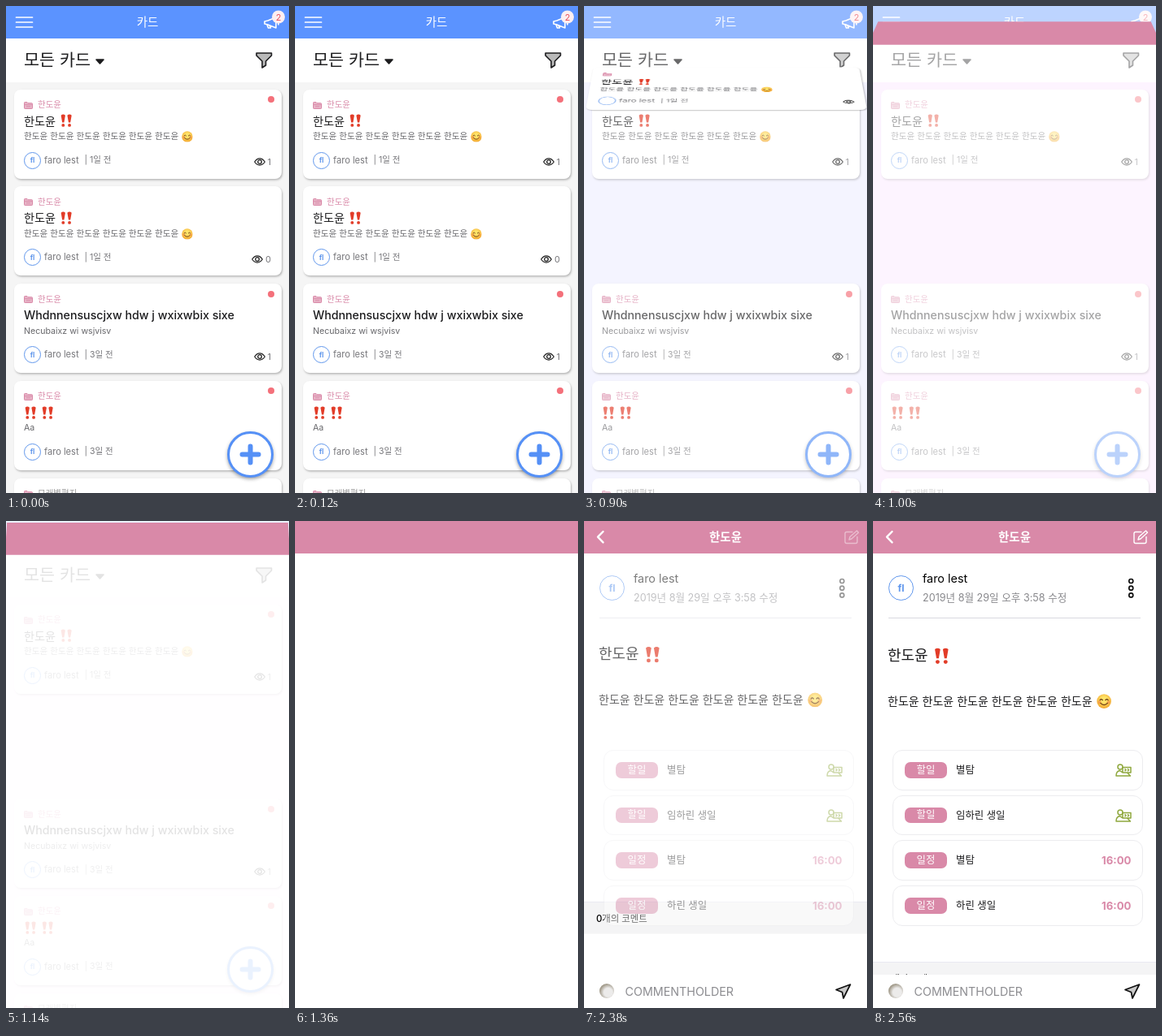
An HTML page for the animation above (2.58 s loop, 348 by 600 pixels).

```html
<!DOCTYPE html>
<html lang="ko">
<head>
<meta charset="utf-8">
<title>Card to page transition</title>
<style>
  :root { --blue: #5b93ff; --pink: #d989a8; --loop: 2580ms; }
  html, body { margin: 0; width: 100%; height: 100%; overflow: hidden; background: #fff; }
  body { font-family: Inter, "Noto Sans CJK KR", "Noto Sans CJK", sans-serif; color: #1c1c1e; }
  #stage { position: relative; width: 348px; height: 600px; overflow: hidden; background: #fff; }
  #stage * { box-sizing: border-box; }
  .layer { position: absolute; inset: 0; overflow: hidden; }
  svg { display: block; flex: none; overflow: visible; }
  svg.art { position: absolute; left: 0; top: 0; }
  .row { position: absolute; display: flex; align-items: center; gap: .36em; height: 20px; line-height: 20px; white-space: pre; }
  .mid { left: 0; width: 348px; justify-content: center; color: #fff; }
  .bang { width: 1.15em; height: 1.15em; }
  .smile { width: 1.3em; height: 1.3em; }
  .ring { position: absolute; border-radius: 50%; border: 1.6px solid #5f96ec; color: #5f96ec;
          display: flex; align-items: center; justify-content: center; font-weight: 700; }

  .top { position: absolute; inset: 0 0 auto; height: 40px; background: var(--blue); }
  .sub { position: absolute; top: 40px; width: 348px; height: 54px; background: #fff; }
  .card { position: absolute; left: 9.5px; width: 329.5px; height: 110px; border-radius: 8px;
          background: #fff; box-shadow: 1px 1.5px 2.5px #0004; }
  .label { font-size: 10.5px; color: var(--pink); gap: 6px; }
  .title { font-size: 14.2px; font-weight: 500; }
  .text { font-size: 10.6px; color: #66666a; }
  .meta { font-size: 11.1px; color: #77777b; }
  .age { font-size: 10.5px; color: #77777b; }
  .views { right: 13px; gap: 3px; font-size: 11px; color: #77777b; }
  .card .ring { left: 12.5px; top: 77px; width: 21px; height: 21px; font-size: 8.5px; }
  .dot { position: absolute; right: 9px; top: 8.5px; width: 8px; height: 8px; border-radius: 50%; background: #f4707a; }
  .fab { position: absolute; left: 272px; top: 524px; width: 57px; height: 57px; border-radius: 50%;
         border: 3px solid #5590f6; background: #fff; box-shadow: 0 2px 4px #0005; }

  .bar { position: absolute; top: 0; width: 348px; height: 40px; background: var(--pink); }
  .line { position: absolute; left: 19px; top: 118.5px; width: 310px; height: 1px; background: #d9d9e0; }
  .task { position: absolute; left: 24px; width: 307.5px; height: 49.5px; border: 1px solid #ececef; border-radius: 12px; background: #fff; }
  .task .row { font-size: 12.4px; }
  .task .tag { left: 14px; width: 52px; height: 19.5px; top: 14px; justify-content: center; border-radius: 7px;
               background: var(--pink); color: #fff; }
  .task .time { right: 13px; font-size: 13.2px; font-weight: 700; color: var(--pink); }
  .strip { position: absolute; top: 320px; width: 348px; height: 40px; background: #f4f4f5; border-top: 1px solid #e9e9f2; }
  .foot { position: absolute; top: 559px; width: 348px; height: 41px; background: #fff; }
  .face { position: absolute; left: 19px; top: 11px; width: 18px; height: 18px; border-radius: 50%;
          background: radial-gradient(circle at 60% 60%, #ecebea 35%, #a9a294 65%, #6f6a4c); }

  /* Each stretch advances in 20 ms ticks. */
  .list { background: #f5f5f5; animation: fade var(--loop) infinite; }
  .slot { animation: leave var(--loop) infinite; }
  .fly { animation: fly var(--loop) infinite; }
  .bar { animation: land var(--loop) infinite; }
  .page { animation: show var(--loop) step-end infinite; }
  .person { animation: person var(--loop) infinite; }
  .body { animation: body var(--loop) infinite; }
  .late { animation: late var(--loop) infinite; }
  .strip { animation: push var(--loop) infinite; }

  @keyframes fade {
    0% { opacity: 1; background-color: #f5f5f5; animation-timing-function: step-end; }
    29.38% { opacity: .95; background-color: #f5f5f6; animation-timing-function: steps(7); }
    34.81% { opacity: .66; background-color: #efefff; animation-timing-function: steps(5); }
    38.68% { opacity: .4; background-color: #fbe4ff; animation-timing-function: steps(6); }
    43.33% { opacity: .14; background-color: #fff0ff; animation-timing-function: steps(8); }
    49.53%, 100% { opacity: 0; background-color: #fff; }
  }
  @keyframes leave {
    0% { opacity: 1; animation-timing-function: step-end; }
    29.38%, 100% { opacity: 0; }
  }
  @keyframes fly {
    0% { opacity: 0; transform: none; animation-timing-function: step-end; }
    29.38% { opacity: 1; transform: translateY(-24.5px) perspective(1700px) translateZ(10px) rotateX(6deg); animation-timing-function: steps(2); }
    30.93% { opacity: 1; transform: translateY(-69px) perspective(1700px) translateZ(17px) rotateX(21deg); animation-timing-function: steps(2); }
    32.48% { opacity: 1; transform: translateY(-112px) perspective(1700px) translateZ(23px) rotateX(38deg); animation-timing-function: steps(3); }
    34.81% { opacity: 1; transform: translateY(-176px) perspective(1700px) translateZ(30px) rotateX(62deg); animation-timing-function: steps(2); }
    36.36%, 100% { opacity: 0; transform: translateY(-209px) perspective(1700px) translateZ(30px) rotateX(86deg); }
    36.35% { opacity: 1; transform: translateY(-209px) perspective(1700px) translateZ(30px) rotateX(86deg); }
  }
  @keyframes land {
    0% { opacity: 0; transform: none; animation-timing-function: step-end; }
    36.36% { opacity: 1; transform: translateY(48px) perspective(380px) rotateX(84deg); animation-timing-function: steps(1); }
    37.13% { opacity: 1; transform: translateY(34px) perspective(380px) rotateX(70deg); animation-timing-function: steps(2); }
    38.68% { opacity: 1; transform: translateY(13px) perspective(380px) rotateX(45deg); animation-timing-function: steps(3); }
    41.01% { opacity: 1; transform: translateY(5px) perspective(380px) rotateX(22deg); animation-timing-function: steps(3); }
    43.33% { opacity: 1; transform: translateY(2px) perspective(380px) rotateX(9deg); animation-timing-function: steps(4); }
    46.43% { opacity: 1; transform: translateY(1px) perspective(380px) rotateX(2deg); animation-timing-function: steps(4); }
    49.53% { opacity: 1; transform: translateY(.6px) perspective(380px) rotateX(0deg); animation-timing-function: step-end; }
    51.86%, 100% { opacity: 1; transform: none; }
  }
  @keyframes show { 0% { opacity: 0; } 86.74%, 100% { opacity: 1; } }
  @keyframes person {
    0%, 86.74% { opacity: .13; animation-timing-function: steps(16); }
    99.15%, 100% { opacity: 1; }
  }
  @keyframes body {
    0%, 86.74% { opacity: .42; transform: translateY(-3px); animation-timing-function: steps(16); }
    99.15%, 100% { opacity: 1; transform: none; }
  }
  @keyframes late {
    0%, 86.74% { opacity: 0; animation-timing-function: steps(16); }
    99.15%, 100% { opacity: 1; }
  }
  @keyframes push {
    0%, 86.74% { transform: none; animation-timing-function: steps(8); }
    92.95% { transform: translateY(170px); animation-timing-function: steps(8); }
    99.15%, 100% { transform: translateY(223px); }
  }
</style>
</head>
<body>
<svg width="0" height="0" style="position:absolute">
  <defs>
    <radialGradient id="sun" cx=".5" cy=".4" r=".6">
      <stop offset=".3" stop-color="#ffe46a"/><stop offset="1" stop-color="#f2a52c"/>
    </radialGradient>
  </defs>
  <symbol id="bang" viewBox="0 0 16 16">
    <path d="M1.6 1.6Q4.2-.4 6.8 1.6L5.3 10.2H3.1ZM9.2 1.6Q11.8-.4 14.4 1.6L12.9 10.2H10.7Z" fill="#e23c28"/>
    <circle cx="4.2" cy="13.6" r="1.9" fill="#e23c28"/><circle cx="11.8" cy="13.6" r="1.9" fill="#e23c28"/>
  </symbol>
  <symbol id="smile" viewBox="0 0 16 16">
    <circle cx="8" cy="8" r="7.8" fill="url(#sun)"/>
    <circle cx="3.2" cy="9" r="1.8" fill="#f28a4a" opacity=".6"/><circle cx="12.8" cy="9" r="1.8" fill="#f28a4a" opacity=".6"/>
    <path d="M3.6 6.8q1.4-2 2.8 0M9.6 6.8q1.4-2 2.8 0M4.2 10q3.8 4 7.6 0" fill="none" stroke="#6b3d14" stroke-width="1.1" stroke-linecap="round"/>
  </symbol>
  <symbol id="folder" viewBox="0 0 11 9">
    <path d="M.5 1.2Q.5.5 1.2.5H4l1 1.2h4.8q.7 0 .7.7v5.4q0 .7-.7.7H1.2q-.7 0-.7-.7Z" fill="#e7b3c6" stroke="#d989a8"/>
    <path d="M1 3.6h9M3 5.8h5" stroke="#d989a8" stroke-width=".8"/>
  </symbol>
  <symbol id="eye" viewBox="0 0 14 10">
    <path d="M.7 5Q3.4.9 7 .9T13.3 5Q10.6 9.1 7 9.1T.7 5Z" fill="#fff" stroke="#222" stroke-width="1.2"/>
    <circle cx="7" cy="5" r="2.3" fill="none" stroke="#222" stroke-width="1.3"/>
  </symbol>
  <symbol id="helper" viewBox="0 0 20 16">
    <g fill="none" stroke="#8fa83e" stroke-width="1.5" stroke-linejoin="round">
      <circle cx="6" cy="4" r="3"/>
      <path d="M1 15q0-5.5 4.5-6.4L9 11h5.5l4 4ZM9 4.5h10V11H9Z"/>
      <path d="M11.5 6.2l1.6 1.5-1.6 1.5M15 6.2l1.6 1.5L15 9.2"/>
    </g>
  </symbol>
</svg>
<div id="stage"></div>

<script>
const user = 'faro lest', initials = 'fl', group = '한도윤';
const icon = (id, w, h) =>
  `<svg class="${id}"${w ? ` width="${w}" height="${h}"` : ''}><use href="#${id}"/></svg>`;
const bang = icon('bang'), smile = icon('smile');

// A line of text whose middle lies at y.
const row = (x, y, cls, html, css = '') =>
  `<div class="row ${cls}" style="${x === null ? '' : `left:${x}px;`}top:${y - 10}px;${css}">${html}</div>`;
const art = body => `<svg class="art" width="348" height="600" fill="none" stroke-linecap="round" stroke-linejoin="round">${body}</svg>`;

function card(i, c, cls = '') {
  const bare = cls === 'fly';
  return `<div class="card ${cls}" style="top:${102.5 + i * 119.8}px">
    ${row(12.5, 19.5, 'label', icon('folder', 11, 9) + (bare ? '' : `<span style="color:${c.tint || ''}">${c.label || group}</span>`))}
    ${row(12.5, 39, 'title', c.title)}
    ${row(12.5, 58.5, 'text', c.text)}
    <div class="ring">${bare ? '' : initials}</div>
    ${row(37.5, 87, 'meta', user)}
    ${row(87, 87.5, 'age', `| ${c.days}일 전`)}
    ${row(null, 89.5, 'views', icon('eye', 14, 10) + (bare ? '' : c.views))}
    ${c.dot ? '<div class="dot"></div>' : ''}
  </div>`;
}

const phrase = Array(6).fill(group).join(' ');
const hello = { title: group + bang, text: phrase + smile, days: 1 };
const cards = [
  { ...hello, views: 1, dot: true },
  { ...hello, views: 0 },
  { title: 'Whdnnensuscjxw hdw j wxixwbix sixe', text: 'Necubaixz wi wsjvisv', days: 3, views: 1, dot: true },
  { title: bang + bang, text: 'Aa', days: 3, views: 1, dot: true },
  { label: '모래별편지~', tint: '#999', title: '', text: '', days: 3, views: 0 }
];

const list = `<div class="layer list">
  <div class="top"></div><div class="sub"></div>
  ${row(0, 19.5, 'mid', '카드', 'font-size:14.5px;font-weight:500')}
  ${row(22, 67, '', '모든 카드', 'font-size:20.7px')}
  ${cards.map((c, i) => card(i, c, i === 1 ? 'slot' : '')).join('')}
  <div class="fab"></div>
  ${art(`
    <path d="M12.5 14h20M12.5 20h20M12.5 26h20" stroke="#fff" stroke-width="1.7"/>
    <path d="M111 66h9l-4.5 5z" fill="#1c1c1e" stroke="#1c1c1e" stroke-width="1.6"/>
    <path d="M308 58h18.500v3l-7 7v5l-4.500 3v-8l-7-7z" fill="#b9b9b9" stroke="#1c1c1e" stroke-width="1.6"/>
    <path d="M318 19l4-1 10-4v13l-10-4-4-1zM321 23l1.500 4h3l-1.500-3M335 18v5" stroke="#fff" stroke-width="1.6"/>
    <circle cx="335" cy="13.500" r="8" fill="#fdeff1"/>
    <path d="M300.500 542.500v20M290.500 552.500h20" stroke="#5590f6" stroke-width="6"/>`)}
  ${row(326, 13.5, '', '2', 'width:18px;justify-content:center;font-size:11px;color:#e8505c')}
</div>`;

const tasks = [['할일', '별탐'], ['할일', '임하린 생일'], ['일정', '별탐', '16:00'], ['일정', '하린 생일', '16:00']]
  .map(([tag, text, time], i) => `<div class="task" style="top:${282 + i * 55.7}px">
    <div class="row tag">${tag}</div>
    ${row(77, 24, '', text)}
    ${row(null, 24, 'time', time || icon('helper', 20, 16))}
  </div>`).join('');

const page = `<div class="layer page">
  ${row(0, 19.5, 'mid', group, 'font-size:14.5px;font-weight:700')}
  ${art('<path d="M23.500 13l-6.500 6.700 6.500 6.700" stroke="#fff" stroke-width="2.4"/>')}
  <div class="layer person">
    <div class="ring" style="left:19px;top:67px;width:31px;height:31px;font-size:12px">${initials}</div>
    ${row(61, 71, '', user, 'font-size:14.4px;color:#000')}
    ${row(61, 95, '', '2019년 8월 29일 오후 3:58 수정', 'font-size:12.6px;color:#88888c')}
  </div>
  <div class="layer body">
    ${row(18, 166, '', group + bang, 'font-size:18px')}
    ${row(18, 222, '', phrase + smile, 'font-size:14px')}
  </div>
  <div class="strip">${row(15, 19.5, '', '0개의 코멘트', 'font-size:11.4px;font-weight:500;color:#000')}</div>
  <div class="layer late">
    <div class="line"></div>
    ${tasks}
    ${art(`
      <path d="M330 13.500h-7q-2 0-2 2v10q0 2 2 2h11q2 0 2-2v-6M326 23l1-3.500 8.500-7.500 2 2.200-8.500 7.800z" stroke="#fff" stroke-width="1.4"/>
      <g stroke="#111" stroke-width="1.7">${[74, 82.7, 91.4].map(y => `<circle cx="317.300" cy="${y}" r="2.500"/>`).join('')}</g>`)}
  </div>
  <div class="foot">
    <div class="face"></div>
    ${row(50.5, 21, '', 'COMMENTHOLDER', 'font-size:14.3px;color:#8c8c90')}
  </div>
  ${art('<path d="M327.500 571l-17.500 6.500 7.500 3 1.500 7.500z" fill="#c9c9c9" stroke="#111" stroke-width="1.700"/>')}
</div>`;

document.getElementById('stage').innerHTML =
  list + card(1, cards[1], 'fly') + '<div class="bar"></div>' + page;
</script>
</body>
</html>
```
